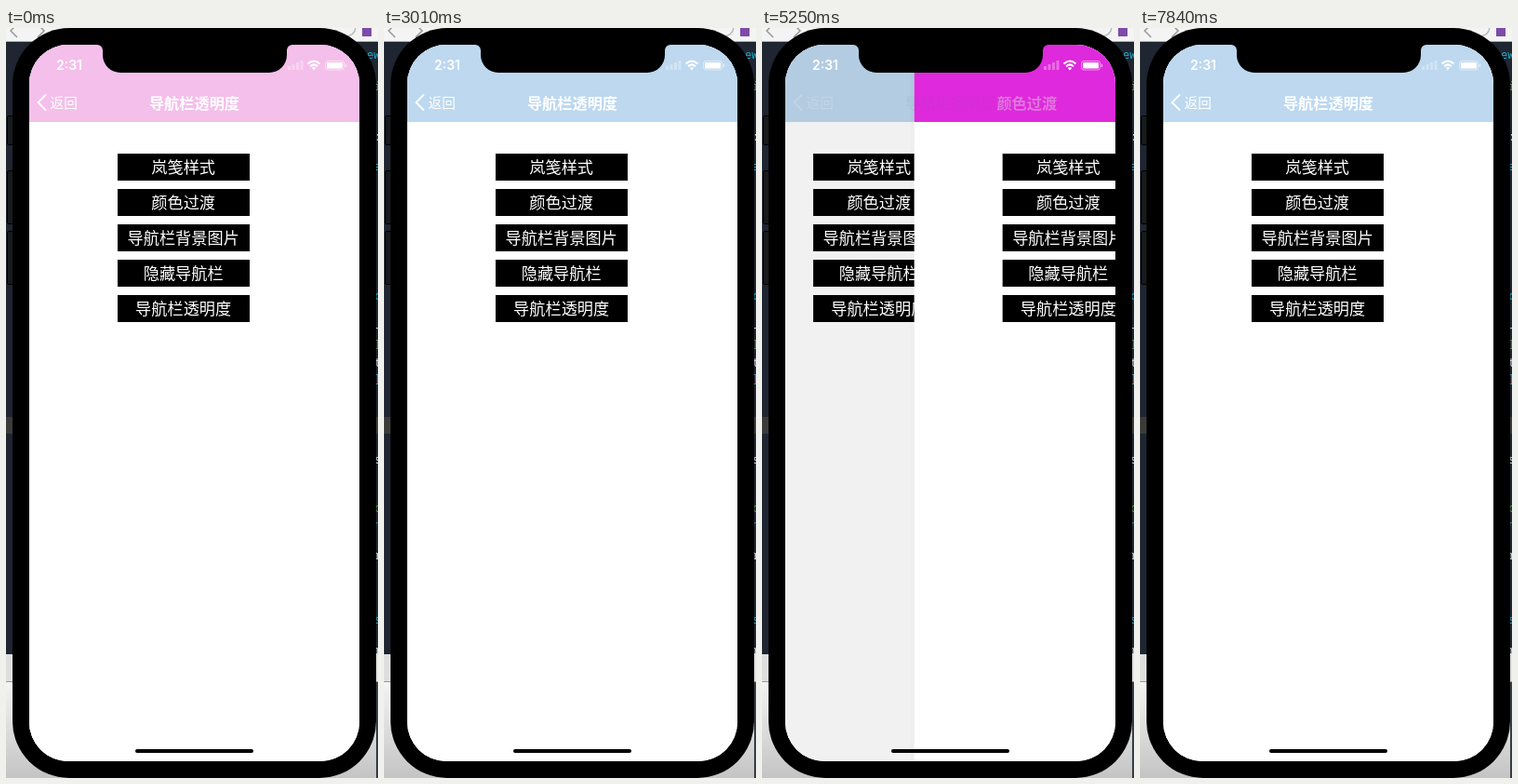
An HTML page that plays this animation: 400x806 px, repeating every 7.91 s.

```html
<!DOCTYPE html>
<html lang="zh-CN">
<head>
<meta charset="utf-8">
<title>导航栏透明度</title>
<style>
/* --p: how far the top page has been moved away, 0 covering to 1 gone */
@property --p { syntax: "<number>"; inherits: true; initial-value: 0; }

html, body { margin: 0; width: 100%; height: 100%; overflow: hidden; }
body { position: relative; background: #1f2531; font-family: "Noto Sans CJK SC", "Noto Sans CJK", "Noto Sans", sans-serif; }
body * { position: absolute; box-sizing: border-box; }

/* desktop behind the phone */
.toolbar { left: 0; top: 0; width: 400px; height: 15px; background: #f4f4f4; border-bottom: 1px solid #aaa; }
.toolbar svg { left: 0; top: 0; }
.panel { left: 0; top: 673px; width: 400px; height: 133px; background: linear-gradient(#dedede 29px, #999 29px, #999 30px, #f4f4f4 30px, #c4c4c4); }
.dark { left: 398px; top: 703px; width: 2px; height: 103px; background: #363b44; }
.band { left: 0; top: 418px; width: 400px; height: 18px; background: #3b3b39; }
.code span { left: 396px; font: 12px/14px "Noto Sans Mono", monospace; }
.key { left: 1px; width: 9px; background: #191a1c; border: 1px solid #000; border-radius: 2px; }

.phone { left: 7px; top: 0; width: 391px; height: 806px; border-radius: 61px; background: #000; }
.screen {
  left: 18px; top: 18px; width: 355px; height: 770px; border-radius: 42px; overflow: hidden; background: #fff;
  animation: slide 7910ms linear infinite;
}
.page { inset: 0; background: #fff; }
.under { translate: calc((var(--p) - 1) * 106.5px) 0; }
.over { translate: calc(var(--p) * 355px) 0; animation: paper 7910ms linear infinite; }
.bar { left: 0; top: 0; width: 355px; height: 83.3px; }
.blue { background: #bdd8ef; }
.magenta { background: #df29dc; }
.blend { animation: blend 7910ms linear infinite; }
.dim { inset: 0; background: #000; animation: dim 7910ms linear infinite; }
.edge {
  left: -5px; top: 0; width: 5px; height: 100%; translate: calc(var(--p) * 355px) 0;
  background: linear-gradient(90deg, #0000, #0001 40%); animation: edge 7910ms linear infinite;
}
.btn {
  left: 94.7px; width: 142px; height: 28.8px; background: #000; color: #fff;
  font-size: 17.2px; line-height: 27px; text-align: center; white-space: nowrap;
}
.title { left: 0; top: 50px; width: 355px; font-size: 16.2px; line-height: 24px; font-weight: 700; text-align: center; }
.stay { animation: stay 7910ms linear infinite; }
.first { translate: calc(var(--p) * 201px) 0; animation: first 7910ms linear infinite; }
.second { animation: second 7910ms linear infinite; }
.back { left: 22.5px; top: 50px; font-size: 14.7px; line-height: 24px; white-space: nowrap; animation: back 7910ms linear infinite; }
.back svg { left: -15px; top: 2px; }
.clock { left: 29px; top: 13px; color: #fff; font: 600 14px/18px Inter, sans-serif; }
.status { left: 0; top: 0; }
.home { left: 114px; top: 757px; width: 127px; height: 4px; border-radius: 2px; background: #000; }

@keyframes slide {
  0%, 4.7% { --p: 0; }
  13.27% { --p: .611; }
  21.3% { --p: .87; }
  23.01% { --p: .89; }
  27% { --p: .97; }
  32.74%, 44.6% { --p: 1; }
  47.79% { --p: .473; }
  50% { --p: .18; }
  52.5% { --p: .04; }
  54.87%, 57% { --p: 0; }
  71.68% { --p: .611; }
  77.88% { --p: .95; }
  83% { --p: .99; }
  87.61%, 100% { --p: 1; }
}
@keyframes blend {
  0%, 4.7% { background: #f4bfea; }
  13.27% { background: #e3e0f2; }
  23.01% { background: #e1e8f5; }
  32.74% { background: #bdd8ef; }
  40% { background: #bdd8ef; visibility: visible; }
  40.01%, 100% { background: #bdd8ef; visibility: hidden; }
}
@keyframes paper {
  0%, 4.7% { background: #fff; }
  13.27% { background: #fbfbfb; }
  23.01%, 100% { background: #fff; }
}
@keyframes dim {
  0%, 4.7% { opacity: .05; }
  13.27% { opacity: .02; }
  23.01% { opacity: .003; }
  32.74%, 44.6% { opacity: 0; }
  47.79% { opacity: .045; }
  54.87%, 57% { opacity: .09; }
  71.68% { opacity: .036; }
  77.88% { opacity: .004; }
  87.61%, 100% { opacity: 0; }
}
@keyframes edge {
  0%, 4.7% { opacity: 0; }
  7%, 13.27% { opacity: 1; }
  23.01% { opacity: .25; }
  32.74%, 44.6% { opacity: 0; }
  47.79% { opacity: .6; }
  54.87%, 57% { opacity: 0; }
  62% { opacity: .4; }
  71.68%, 100% { opacity: 0; }
}
@keyframes stay {
  0%, 15% { color: #fff0; }
  23.01% { color: #fff7; }
  32.74%, 44.6% { color: #fff; }
  47.79% { color: #fff8; }
  51%, 60% { color: #fff0; }
  71.68% { color: rgba(70, 110, 150, .12); }
  77.88% { color: #fff6; }
  87.61%, 100% { color: #fff; }
}
@keyframes first {
  0%, 4.7% { color: #fff; }
  13.27% { color: #fff1; }
  16%, 100% { color: #fff0; }
}
@keyframes second {
  0%, 44.6% { color: #fff0; }
  47.79% { color: #fff9; }
  54.87%, 57% { color: #fff; }
  0%, 57% { translate: calc(var(--p) * 228px) 0; }
  71.68% { color: rgba(120, 40, 130, .2); }
  71.68%, 100% { translate: calc(var(--p) * 201px) 0; }
  76%, 100% { color: #fff0; }
}
@keyframes back {
  0%, 4.7% { color: #fff; }
  13.27%, 15% { color: #fff0; }
  23.01% { color: #fff9; }
  32.74%, 57% { color: #fff; }
  71.68% { color: rgba(60, 100, 140, .14); }
  77.88% { color: #fff6; }
  87.61%, 100% { color: #fff; }
}
</style>
</head>
<body>
<div class="toolbar">
  <svg width="400" height="14" fill="none" stroke="#999" stroke-width="1.5">
    <path d="M12 -4L5 3L12 10M34 -4L41 3L34 10"/>
    <path d="M365 9Q376 8 376 -2" stroke="#bbb"/>
    <rect x="383" y="-2" width="10" height="11" fill="#7d4ba8" stroke="none"/>
  </svg>
</div>
<div class="band"></div>
<div class="panel"></div>
<div class="dark"></div>
<div class="code"></div>
<div class="key" style="top:94px;height:32px"></div>
<div class="key" style="top:153px;height:58px"></div>
<div class="key" style="top:218px;height:58px"></div>

<div class="phone">
  <div class="screen">
    <div class="page under"></div>
    <div class="bar blue"></div>
    <div class="dim"></div>
    <div class="page under menu" style="background:none"></div>
    <div class="page over menu"><div class="bar magenta"></div></div>
    <div class="bar blend"></div>
    <div class="edge"></div>
    <div class="title stay">导航栏透明度</div>
    <div class="title first">导航栏透明度</div>
    <div class="title second">颜色过渡</div>
    <div class="back">
      <svg width="12" height="20" fill="none" stroke="currentColor" stroke-width="1.8"><path d="M10 1.500L1.500 10L10 18.500"/></svg>返回
    </div>
    <div class="clock">2:31</div>
    <svg class="status" width="355" height="60" fill="#fff">
      <path fill="#000" d="M73 0A6 6 0 0 1 79 6V11A19 19 0 0 0 98 30H258A19 19 0 0 0 277 11V6A6 6 0 0 1 283 0Z"/>
      <path opacity=".32" d="M278 23h3v4h-3zM282.5 21h3v6h-3zM287 19h3v8h-3zM291.500 17h3v10h-3z"/>
      <g fill="none" stroke="#fff" stroke-width="2">
        <path d="M299.500 20.500Q306 14.500 312.500 20.500M302 23.200Q306 19.600 310 23.200"/>
      </g>
      <path d="M303.800 25Q306 23 308.200 25L306 27.400Z"/>
      <rect x="318.500" y="17.500" width="20" height="9.500" rx="2.500" fill="none" stroke="#fff" stroke-opacity=".5"/>
      <rect x="320" y="19" width="17" height="6.500" rx="1.300"/>
      <rect x="339.800" y="20.500" width="1.300" height="3.500" rx=".6" opacity=".6"/>
    </svg>
    <div class="home"></div>
  </div>
</div>

<script>
const add = (parent, className, text, style) => {
  const el = document.createElement(className ? "div" : "span");
  el.className = className;
  el.textContent = text;
  Object.assign(el.style, style);
  parent.append(el);
};

const labels = ["岚笺样式", "颜色过渡", "导航栏背景图片", "隐藏导航栏", "导航栏透明度"];
for (const menu of document.querySelectorAll(".menu"))
  labels.forEach((text, i) => add(menu, "btn", text, { top: 117.2 + i * 37.9 + "px" }));

// slivers of code beside the phone
const cyan = "#1fa9c9", green = "#4b9a4b", white = "#d8d8d8";
const code = document.querySelector(".code");
add(code, "", "ew", { left: "388px", top: "22px", color: cyan });
[["i", 56, green], [":", 110, white], ["a", 142, cyan], ["c", 281, cyan], ["-", 315, white],
 ["l", 334, green], ["t", 353, white], ["]", 370, cyan], ["s", 457, white], ["c", 509, green],
 ["n", 527, cyan], ["r", 560, white], ["s", 629, cyan], ["r", 662, white]]
  .forEach(([text, y, color]) => add(code, "", text, { top: y + "px", color }));
</script>
</body>
</html>
```
